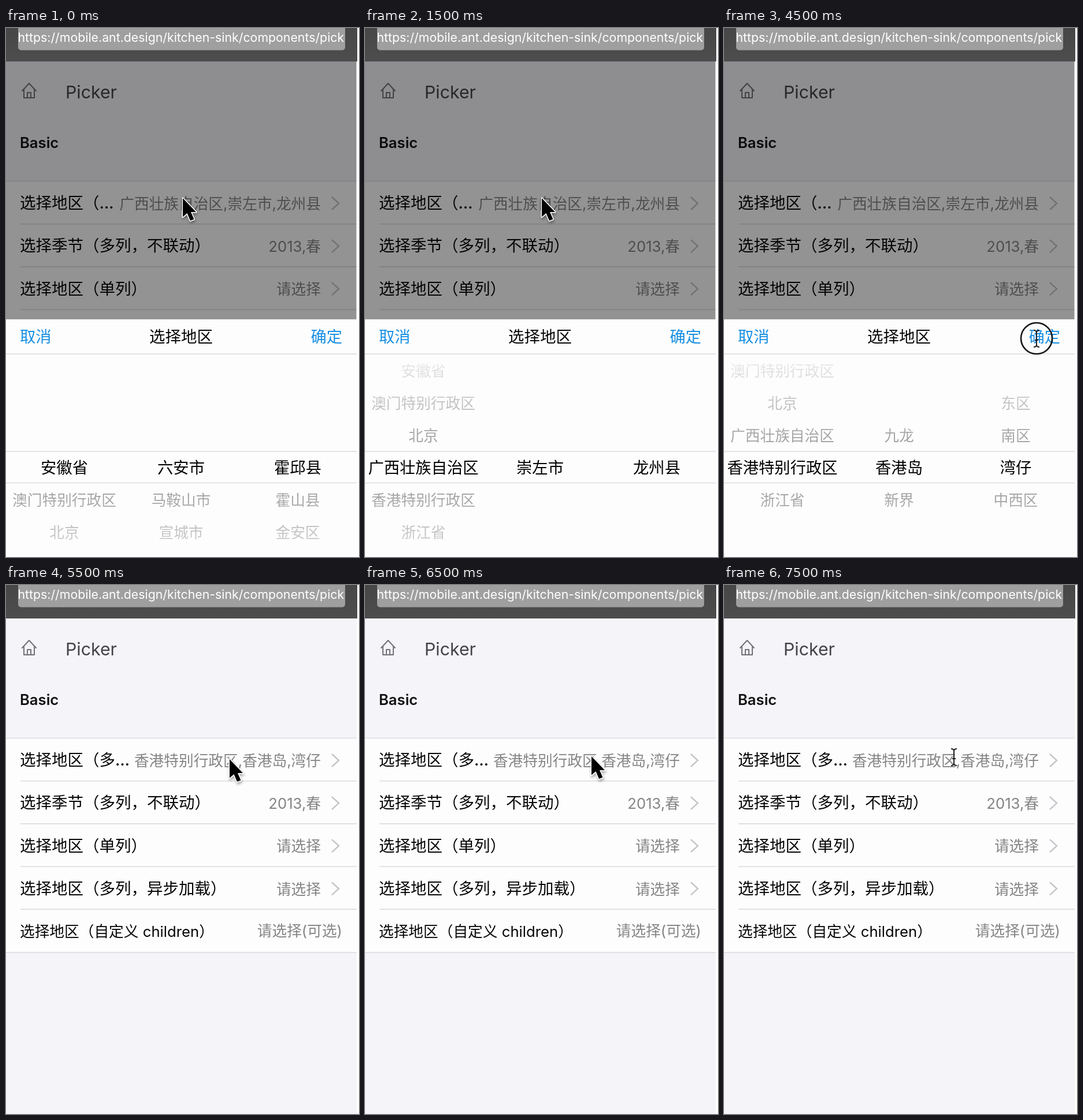
An HTML page that plays this animation: 611 px wide and 917 px high, repeating every 8000 ms.

```html
<!DOCTYPE html>
<html lang="zh-CN">
<head>
<meta charset="utf-8">
<title>Picker</title>
<style>
  html, body { margin: 0; width: 100%; height: 100%; overflow: hidden; background: #fdfdfd; }
  svg { display: block; width: 611px; height: 917px; }
  text { font-family: Inter, "Noto Sans CJK SC", "Noto Sans CJK", sans-serif; white-space: pre; }
  .label { font-size: 27.5px; font-weight: 500; fill: #050505; }
  .label.small { font-size: 25.7px; font-weight: 400; }
  .value { font-size: 25.7px; fill: #858585; text-anchor: end; }
  .item { font-size: 25.7px; fill: #000; text-anchor: middle; }
  .item.on { font-size: 27.3px; font-weight: 500; }
  .action { font-size: 27.3px; font-weight: 500; fill: #178fe3; }
  .mid { text-anchor: middle; }
  .end { text-anchor: end; }
  .line { stroke: #dcdcdf; stroke-width: 1.6; }
  .chevron { fill: none; stroke: #c4c4c9; stroke-width: 2.4; }
  .home { fill: none; stroke: #737377; stroke-width: 2; stroke-linejoin: round; stroke-linecap: round; }
</style>
</head>
<body>
<svg viewBox="0 0 611 917">
  <defs>
    <linearGradient id="fadeTop" x1="0" y1="0" x2="0" y2="1">
      <stop offset="0" stop-color="#fdfdfd" stop-opacity=".95"/>
      <stop offset="1" stop-color="#fdfdfd" stop-opacity=".6"/>
    </linearGradient>
    <linearGradient id="fadeBottom" x1="0" y1="0" x2="0" y2="1">
      <stop offset="0" stop-color="#fdfdfd" stop-opacity=".6"/>
      <stop offset="1" stop-color="#fdfdfd" stop-opacity=".95"/>
    </linearGradient>
    <linearGradient id="bar" x1="0" y1="0" x2="0" y2="1">
      <stop offset="0" stop-color="#474747"/>
      <stop offset="1" stop-color="#4d4d4d"/>
    </linearGradient>
    <clipPath id="urlClip"><rect x="21" y="0" width="566" height="38"/></clipPath>
    <clipPath id="wheelClip"><rect x="0" y="566" width="607" height="390"/></clipPath>
    <filter id="shadow" x="-50%" y="-50%" width="200%" height="200%">
      <feDropShadow dx="1" dy="3" stdDeviation="2" flood-opacity=".35"/>
    </filter>
  </defs>

  <rect width="611" height="917" fill="#fdfdfd"/>
  <rect y="57" width="607" height="860" fill="#f4f4f9"/>
  <path class="home" d="M28 109 40 96 52 109M31 107V121H49V107M37 121V112H43V121"/>
  <text x="103" y="122" font-size="30.3" fill="#444448">Picker</text>
  <text x="24" y="207.500" font-size="25.6" font-weight="600" fill="#111">Basic</text>
  <rect y="265" width="607" height="372" fill="#fdfdfd"/>
  <path class="line" d="M0 265.500H607M0 637H607"/>
  <g id="rows"></g>
  <rect id="mask" y="57" width="606.500" height="860"/>

  <rect width="608" height="58" fill="url(#bar)"/>
  <rect x="21" y="-10" width="566" height="48.500" rx="5" fill="#9f9f9f"/>
  <text x="20.500" y="23.500" font-size="21.3" fill="#fff" clip-path="url(#urlClip)">https://mobile.ant.design/kitchen-sink/components/pick</text>

  <g id="picker">
    <rect y="505" width="607" height="500" fill="#fdfdfd"/>
    <text class="action" x="24" y="544.500">取消</text>
    <text class="label mid" x="303" y="544.500">选择地区</text>
    <text class="action end" x="582" y="544.500">确定</text>
    <g id="wheels" clip-path="url(#wheelClip)"></g>
    <rect y="566" width="607" height="168" fill="url(#fadeTop)"/>
    <rect y="788" width="607" height="168" fill="url(#fadeBottom)"/>
    <path class="line" d="M0 565H607M0 734H607M0 788.500H607"/>
  </g>

  <g id="pointer">
    <path id="arrow" d="M0 0V32.500L7.500 26 13 39 19.500 36.500 14 24H23Z" fill="#000" stroke="#fff"
      stroke-width="3" stroke-linejoin="round" paint-order="stroke" filter="url(#shadow)"/>
    <path id="beam" d="M-5-14Q0-14 0-10Q0-14 5-14M0-10V11M-5 15Q0 15 0 11Q0 15 5 15M-3 3H3"
      fill="none" stroke="#222" stroke-width="2"/>
    <circle id="ring" r="27" fill="none" stroke="#151515" stroke-width="2.600"/>
  </g>
</svg>
<script>
  const STEP = 500, ROW = 56, CENTER = 762, SLIDE = 412;
  const $ = id => document.getElementById(id);

  const provinces = ['安徽省', '澳门特别行政区', '北京', '广西壮族自治区', '香港特别行政区', '浙江省'];
  const districts = ['东区', '南区', '湾仔', '中西区'];
  const cities = ['九龙', '香港岛', '新界'];

  // A wheel is [items, selected index, scroll in px].
  const anhui = [[provinces, 0], [['六安市', '马鞍山市', '宣城市'], 0], [['霍邱县', '霍山县', '金安区'], 0]];
  const guangxi = [[provinces, 3], [['崇左市'], 0], [['龙州县'], 0]];
  const kowloon = scroll => [[provinces, 4], [cities, 0, scroll], [['观塘区', '黄大仙区', '九龙城区'], 0]];
  const island = pick => [[provinces, 4], [cities, 1], [districts, pick]];

  // Each scene: pointer kind, x, y, wheels (none = closed), downward slide of the sheet.
  const scenes = [
    ['arrow', 306, 295, anhui],
    ['arrow', 306, 295, anhui, 9],
    ['beam', 306, 298],
    ['arrow', 306, 295, guangxi],
    ['arrow', 100, 859, guangxi],
    ['arrow', 276, 803, kowloon(0)],
    ['arrow', 279, 777, kowloon(28)],
    ['arrow', 500, 855, island(0)],
    ['arrow', 505, 640, island(2)],
    ['click', 541, 538, island(2)],
    ['arrow', 525, 569],
    ['arrow', 387, 302],
    ['arrow', 390, 298, island(2), 21],
    ['arrow', 392, 297],
    ['arrow', 396, 297, island(2), 56],
    ['beam', 398, 298]
  ];
  const CONFIRMED = 10;

  const text = (cls, x, y, str) => `<text class="${cls}" x="${x}" y="${y}">${str}</text>`;

  function rowsMarkup(done) {
    const rows = [
      done ? ['选择地区（多…', '香港特别行政区,香港岛,湾仔'] : ['选择地区（…', '广西壮族自治区,崇左市,龙州县'],
      ['选择季节（多列，不联动）', '2013,春'],
      ['选择地区（单列）', '请选择'],
      ['选择地区（多列，异步加载）', '请选择'],
      ['选择地区（自定义 children）', '请选择(可选)']
    ];
    return rows.map(([label, value], i) => {
      const y = 303 + i * 74.1, last = i === 4;
      return text(last ? 'label small' : 'label', 24, y + 10.3, label) +
        text('value', last ? 582 : 545, y + (last ? 9.7 : 11.2), value) +
        (last ? '' : `<path class="chevron" d="M564 ${y - 10}l12 11-12 11"/>
          <path class="line" d="M25 ${y + 36.8}H607"/>`);
    }).join('');
  }

  const wheelMarkup = ([items, pick, scroll = 0], col) => items.map((name, i) => {
    const on = i === pick;
    const y = CENTER + (i - pick) * ROW - scroll + (on ? 10.3 : 9.8);
    return text(on ? 'item on' : 'item', 101 + col * 202, y, name);
  }).join('');

  const show = (id, on) => $(id).style.display = on ? '' : 'none';

  function draw(n) {
    const [kind, x, y, wheels, slide = 0] = scenes[n];
    $('rows').innerHTML = rowsMarkup(n >= CONFIRMED);
    show('picker', wheels);
    show('mask', wheels);
    if (wheels) {
      $('wheels').innerHTML = wheels.map(wheelMarkup).join('');
      $('picker').setAttribute('transform', `translate(0 ${slide})`);
      $('mask').setAttribute('fill-opacity', 0.42 * (1 - slide / SLIDE));
    }
    $('pointer').setAttribute('transform', `translate(${x} ${y})`);
    show('arrow', kind === 'arrow');
    show('beam', kind !== 'arrow');
    show('ring', kind === 'click');
  }

  let shown = -1;
  const start = performance.now();
  function tick() {
    const n = Math.floor((performance.now() - start) / STEP) % scenes.length;
    if (n !== shown) draw(shown = n);
    requestAnimationFrame(tick);
  }
  tick();
</script>
</body>
</html>
```
